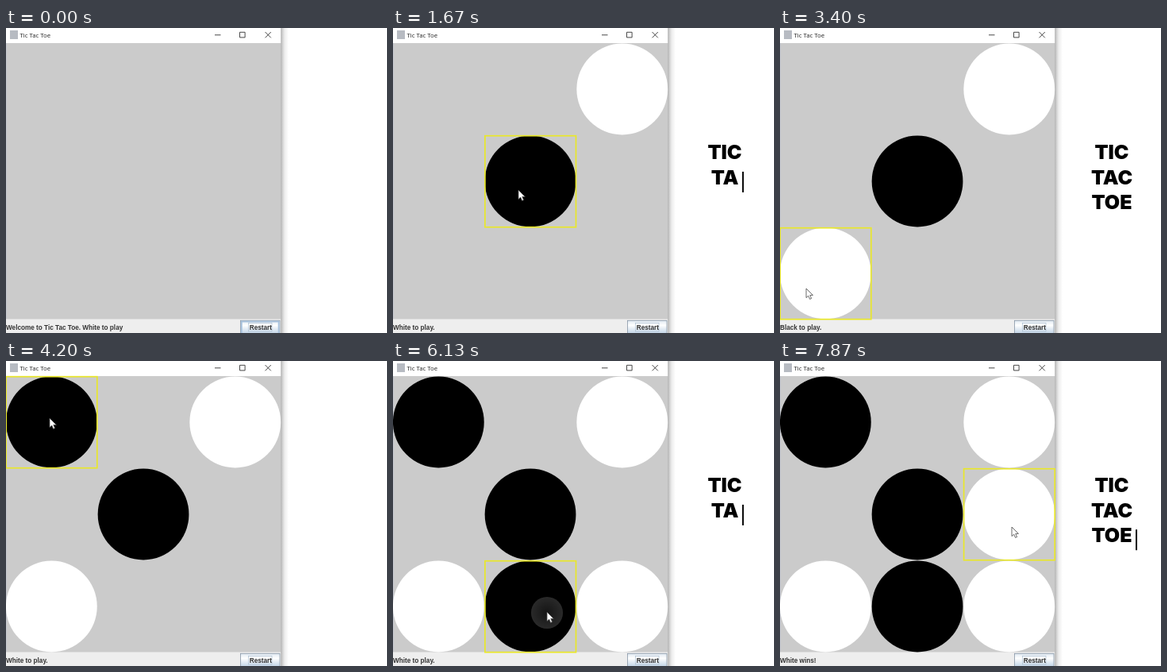
An HTML page that plays this animation: 480x384 px, repeating every 8340 ms.

```html
<!DOCTYPE html>
<html lang="en">
<head>
<meta charset="utf-8">
<title>Tic Tac Toe</title>
<style>
  html, body { margin: 0; width: 100%; height: 100%; overflow: hidden; background: #fff; }
  svg { display: block; width: 480px; height: 384px; }
  .bold { font: bold 8.2px "Liberation Sans", Arial, sans-serif; fill: #333; }
  .title { font: 7.8px "Open Sans", "Noto Sans", sans-serif; fill: #222; }
  .headline { font: 900 25px Inter, sans-serif; text-anchor: middle; fill: #000; }
</style>
</head>
<body>
<svg viewBox="0 0 480 384">
  <defs>
    <linearGradient id="shadow">
      <stop offset="0" stop-color="#c2c2c2"/>
      <stop offset=".45" stop-color="#ededed"/>
      <stop offset="1" stop-color="#fff"/>
    </linearGradient>
    <linearGradient id="metal" x2="0" y2="1">
      <stop offset="0" stop-color="#dfe8f1"/>
      <stop offset=".35" stop-color="#fff"/>
      <stop offset="1" stop-color="#bdd1e5"/>
    </linearGradient>
    <radialGradient id="glow">
      <stop offset="0" stop-color="#fff" stop-opacity=".5"/>
      <stop offset="1" stop-color="#fff"/>
    </radialGradient>
  </defs>

  <rect x="347" width="9" height="384" fill="url(#shadow)"/>
  <rect y="19" width="346.5" height="348" fill="#cbcbcb"/>
  <rect y="366.5" width="346.5" height="18" fill="#eee"/>
  <path d="M346.7 0V384" stroke="#a5a5a5" stroke-width=".8"/>
  <path d="M.3 19V366" stroke="#b9bfd0" stroke-width=".6"/>

  <rect x="5" y="3" width="10" height="11" fill="#b7bbc2"/>
  <text class="title" x="17.5" y="12">Tic Tac Toe</text>
  <path d="M263 8.8h7.5M294.5 5.3h6.6v6.6h-6.6zM326.5 5l7.3 7.3M333.8 5l-7.3 7.3"
        fill="none" stroke="#333" stroke-width=".9"/>

  <g id="pieces"></g>
  <rect id="hover" width="114.6" height="115" fill="none" stroke="#e9e72b" stroke-width="1.7"/>
  <circle id="ripple" fill="url(#glow)"/>

  <text id="status" class="bold" x="0" y="380"></text>
  <rect x="295.5" y="368.3" width="49.5" height="17" fill="url(#metal)" stroke="#8796a6" stroke-width=".8"/>
  <rect id="rollover" x="296.8" y="369.6" width="46.8" height="16" fill="none" stroke="#a9c3de" stroke-width="1.8"/>
  <rect x="305.5" y="371.5" width="29.5" height="10.5" fill="none" stroke="#a3b8cc" stroke-width=".6"/>
  <text class="bold" x="306.8" y="380">Restart</text>

  <path id="mouse" d="M0 0V11.6L2.7 9.2 4.6 13.4 6.6 12.5 4.8 8.4H8.4Z"
        fill="#fff" stroke="#444" stroke-width=".8"/>

  <g id="headline"></g>
  <rect id="caret" width="2" height="26"/>
</svg>
<script>
const LOOP = 8340, CELL = 115.7, TOP = 19, CENTER = 418, LEADING = 31.3, RIPPLE = 170;
const $ = id => document.getElementById(id);
const set = (el, attrs) => Object.entries(attrs).forEach(([k, v]) => el.setAttribute(k, v));
const add = (parent, tag, attrs) => {
  const el = document.createElementNS("http://www.w3.org/2000/svg", tag);
  set(el, attrs);
  return parent.appendChild(el);
};

// time, typed lines; "|" marks a visible caret
const typing = [
  [0, ""], [330, "T"], [530, "T|"], [670, "TI|"], [1000, "TIC|"], [1070, "TIC"],
  [1330, "TIC/T"], [1600, "TIC/T|"], [1670, "TIC/TA|"], [2000, "TIC/TAC|"], [2130, "TIC/TAC"],
  [2330, "TIC/TAC/T"], [2670, "TIC/TAC/TO|"], [3000, "TIC/TAC/TOE|"], [3200, "TIC/TAC/TOE"],
  [3730, "TIC/TAC/TOE|"],
  [4200, ""], [4530, "T"], [4730, "T|"], [4870, "TI|"], [5200, "TIC|"], [5270, "TIC"],
  [5530, "TIC/T"], [5730, "TIC/T|"], [5870, "TIC/TA|"], [6200, "TIC/TAC|"], [6330, "TIC/TAC"],
  [6530, "TIC/TAC/T"], [6800, "TIC/TAC/T|"], [6870, "TIC/TAC/TO|"], [7200, "TIC/TAC/TOE|"],
  [7330, "TIC/TAC/TOE"], [7870, "TIC/TAC/TOE|"]
];

// time, column, row; white starts and the players alternate
const moves = [
  [190, 2, 0], [900, 1, 1], [1980, 0, 2], [3830, 0, 0], [4830, 2, 2], [6100, 1, 2], [6500, 2, 1]
];

// time, x, y of the pointer tip
const pointer = [
  [0, 316, 392], [60, 316, 392], [190, 290, 80], [850, 290, 80], [900, 158, 204],
  [1850, 158, 204], [1980, 33, 328], [3580, 33, 328], [3800, 55, 72],
  [4560, 55, 72], [4810, 286, 319], [5850, 286, 319], [6090, 194, 316],
  [6290, 194, 316], [6490, 292, 209], [LOOP, 292, 209]
];

const pieces = moves.map(([, col, row], i) => add($("pieces"), "circle", {
  cx: (col + .5) * CELL - .5, cy: TOP + (row + .5) * 116, r: 57.4,
  fill: i % 2 ? "#000" : "#fff"
}));
const lines = [0, 1, 2].map(i =>
  add($("headline"), "text", { class: "headline", x: CENTER, y: 165.3 + i * LEADING }));

const show = (el, on) => set(el, { visibility: on ? "visible" : "hidden" });
const ease = p => p * p * (3 - 2 * p);

function pointerAt(t) {
  const i = pointer.findIndex(key => key[0] > t);
  const [t0, x0, y0] = pointer[i - 1], [t1, x1, y1] = pointer[i];
  const p = ease((t - t0) / (t1 - t0));
  return [x0 + (x1 - x0) * p, y0 + (y1 - y0) * p];
}

let typed = null;
function drawHeadline(t) {
  const text = typing.findLast(key => key[0] <= t)[1];
  if (text === typed) return;
  typed = text;
  const words = text.replace("|", "").split("/");
  lines.forEach((line, i) => line.textContent = words[i] || "");
  const last = words.length - 1;
  set($("caret"), {
    x: CENTER + lines[last].getComputedTextLength() / 2 + 4.5,
    y: 149.6 + last * LEADING
  });
  show($("caret"), text.endsWith("|"));
}

function drawGame(t) {
  const [x, y] = pointerAt(t);
  set($("mouse"), { transform: `translate(${x} ${y})` });
  show($("rollover"), t < 70);

  const col = Math.min(2, Math.floor(x / CELL)), row = Math.floor((y - TOP) / 116);
  show($("hover"), row < 3);
  set($("hover"), { x: col * CELL + .2, y: TOP + row * 116 + .7 });

  const count = moves.filter(move => move[0] <= t).length;
  pieces.forEach((piece, i) => show(piece, i < count));
  $("status").textContent =
    count === 0 ? "Welcome to Tic Tac Toe. White to play" :
    count === moves.length ? "White wins!" :
    count % 2 ? "Black to play." : "White to play.";

  const age = count ? t - moves[count - 1][0] : RIPPLE;
  show($("ripple"), age < RIPPLE);
  set($("ripple"), {
    cx: x, cy: y + 1, r: 18.5 + Math.min(age, RIPPLE) * .05,
    opacity: .2 * Math.max(0, 1 - age / RIPPLE)
  });
}

const start = performance.now();
function frame() {
  const t = (performance.now() - start) % LOOP;
  drawHeadline(t);
  drawGame(t);
  requestAnimationFrame(frame);
}
frame();
</script>
</body>
</html>
```
